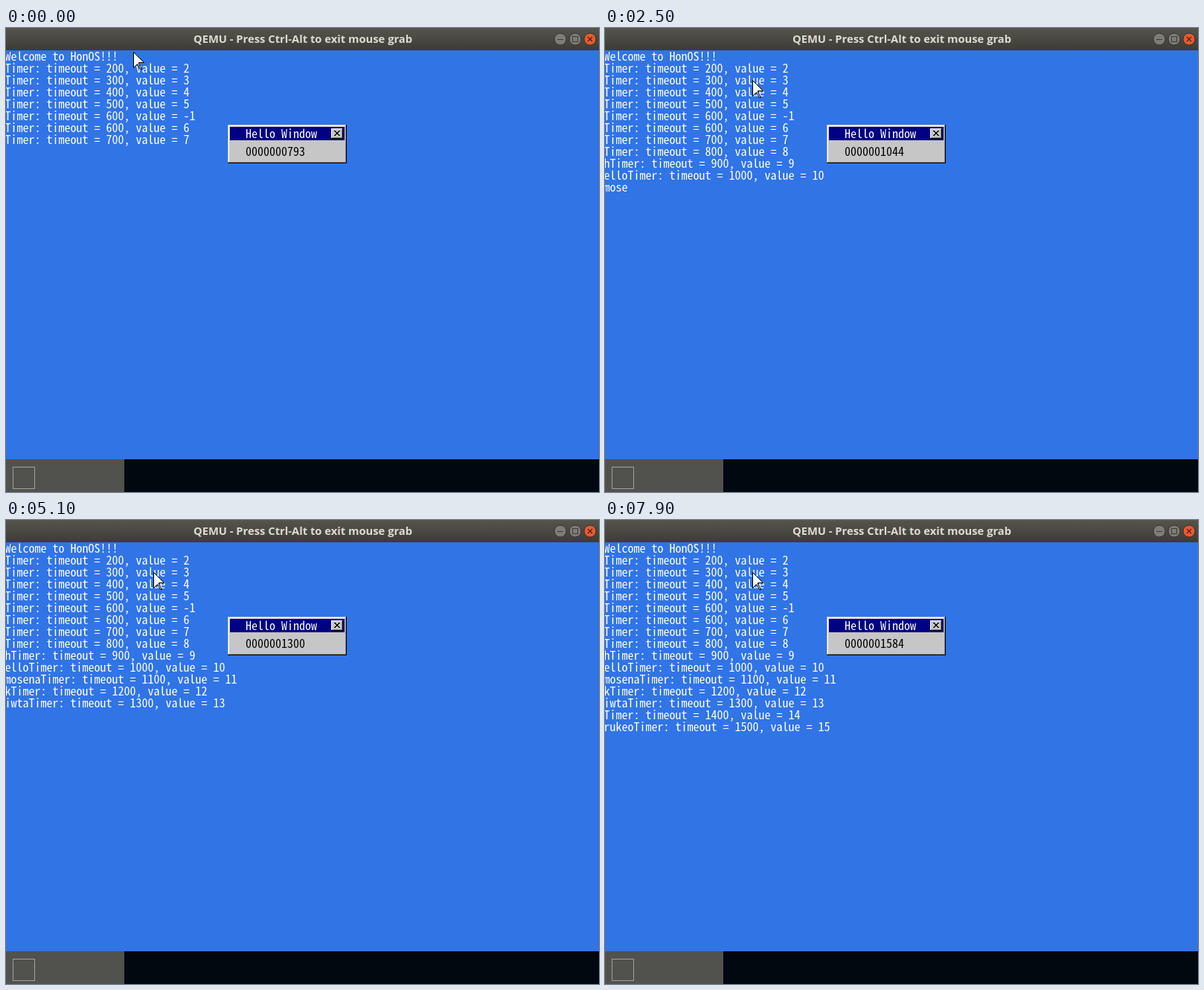
An HTML page with a canvas that plays this animation: 797 by 624 pixels, repeating every 8000 ms.

```html
<!DOCTYPE html>
<html lang="en">
<head>
<meta charset="utf-8">
<title>QEMU console</title>
<style>
  html, body { margin: 0; width: 100%; height: 100%; overflow: hidden; background: #3174e6; }
  canvas { display: block; }
</style>
</head>
<body>
<canvas id="stage" width="797" height="624"></canvas>
<script>
const ctx = document.getElementById('stage').getContext('2d');
const LOOP = 8000, STEP = 100, CELL = 8, ROW = 16;
const MONO = '300 16px "Noto Sans Mono CJK JP", "Noto Sans Mono CJK SC", "Noto Sans Mono", monospace';

const timer = (n, value = n) => `Timer: timeout = ${n}00, value = ${value}\n`;
const opening = 'Welcome to HonOS!!!\n' +
  [2, 3, 4, 5].map(n => timer(n)).join('') + timer(6, -1) + timer(6) + timer(7);

// Console output: [time in ms, text appended]
const output = [
  [0, opening], [100, timer(8)],
  [1000, 'h'], [1100, timer(9)], [1100, 'e'], [1200, 'l'], [1400, 'l'], [1500, 'o'],
  [2100, timer(10)], [2200, 'm'], [2300, 'o'], [2400, 's'], [2500, 'e'], [2600, 'n'], [2700, 'a'],
  [3100, timer(11)], [3900, 'k'],
  [4100, timer(12)], [4300, 'i'], [4500, 'w'], [4700, 't'], [4800, 'a'],
  [5100, timer(13)], [6100, timer(14)],
  [6500, 'r'], [6600, 'u'], [6700, 'k'], [6800, 'e'], [6900, 'o'],
  [7100, timer(15)],
];

// Counter readings: [time in ms, ticks]
const ticks = [[0, 793], [1100, 905], [2500, 1044], [3800, 1176], [5100, 1300], [6100, 1407], [7900, 1584]];

function countAt(t) {
  const i = Math.max(1, ticks.findIndex(k => k[0] >= t));
  const [t0, a] = ticks[i - 1], [t1, b] = ticks[i];
  return Math.round(a + (b - a) * (t - t0) / (t1 - t0));
}

function rect(x, y, w, h, color) {
  ctx.fillStyle = color;
  ctx.fillRect(x, y, w, h);
}

function print(text, x, y, color) {
  ctx.font = MONO;
  ctx.textAlign = 'left';
  ctx.fillStyle = color;
  [...text].forEach((c, i) => ctx.fillText(c, x + i * CELL, y + 14));
}

function line(points, color, width = 1) {
  ctx.beginPath();
  points.forEach(([x, y]) => ctx.lineTo(x, y));
  ctx.strokeStyle = color;
  ctx.lineWidth = width;
  ctx.stroke();
}

function button(x, fill, edge) {
  ctx.beginPath();
  ctx.arc(x, 15, 8, 0, 7);
  ctx.fillStyle = fill;
  ctx.fill();
  ctx.strokeStyle = edge;
  ctx.lineWidth = 1;
  ctx.stroke();
}

function titleBar() {
  const shade = ctx.createLinearGradient(0, 0, 0, 30);
  shade.addColorStop(0, '#56554c');
  shade.addColorStop(1, '#3c3b37');
  rect(0, 0, 797, 30, shade);
  ctx.font = 'bold 14.75px "Open Sans", "Noto Sans", sans-serif';
  ctx.textAlign = 'center';
  ctx.fillStyle = '#dfdbd2';
  ctx.fillText('QEMU - Press Ctrl-Alt to exit mouse grab', 399, 20);
  button(745, '#7d7c75', '#33322e');
  button(765, '#7d7c75', '#33322e');
  button(785, '#ea5a30', '#33322e');
  line([[741, 15.5], [749, 15.5]], '#3c3b37');
  ctx.strokeRect(761.5, 11.5, 7, 7);
  line([[782, 12], [788, 18]], '#4a2318', 1.3);
  line([[788, 12], [782, 18]], '#4a2318', 1.3);
}

function desktop() {
  rect(0, 30, 797, 550, '#3174e6');
  rect(0, 580, 797, 44, '#01080f');
  rect(0, 580, 159, 44, '#51514d');
  ctx.strokeStyle = '#a0a09e';
  ctx.lineWidth = 1;
  ctx.strokeRect(9.5, 590.5, 29, 29);
}

// Raised box: light top-left edge, grey and black bottom-right edges
function bevel(x, y, w, h, light) {
  rect(x, y, w, h, '#000');
  rect(x, y, w - 1, h - 1, light);
  rect(x + 1, y + 1, w - 2, h - 2, '#848484');
}

function counterWindow(count) {
  const x = 298, y = 130;
  bevel(x, y, 160, 52, '#c6c6c6');
  rect(x + 1, y + 1, 157, 49, '#fff');
  rect(x + 2, y + 2, 156, 48, '#c6c6c6');
  rect(x + 3, y + 3, 154, 18, '#000084');
  print('Hello Window', x + 24, y + 4, '#fff');
  bevel(x + 139, y + 5, 16, 14, '#fff');
  rect(x + 140, y + 6, 13, 11, '#c6c6c6');
  for (let i = 0; i < 7; i++) {
    rect(x + 143 + i, y + 8 + i, 2, 1, '#000');
    rect(x + 149 - i, y + 8 + i, 2, 1, '#000');
  }
  print(String(count).padStart(10, '0'), x + 24, y + 28, '#000');
}

function pointer(t) {
  const p = Math.min(1, Math.max(0, (t - 100) / 700));
  const e = p * p * (3 - 2 * p);
  ctx.save();
  ctx.translate(Math.round(171 + 27 * e) + 0.5, Math.round(32 + 38 * e) + 0.5);
  ctx.beginPath();
  [[0, 0], [14, 14], [7, 14], [7, 16], [11, 23], [9, 23], [5, 16], [0, 21]]
    .forEach(([x, y]) => ctx.lineTo(x, y));
  ctx.closePath();
  ctx.fillStyle = '#fff';
  ctx.fill();
  ctx.strokeStyle = '#000';
  ctx.lineWidth = 1;
  ctx.stroke();
  ctx.restore();
}

function draw(t) {
  desktop();
  const text = output.filter(([at]) => at <= t).map(([, s]) => s).join('');
  text.split('\n').forEach((s, i) => print(s, -1.5, 30 + i * ROW, '#fff'));
  counterWindow(countAt(t));
  pointer(t);
  titleBar();
}

const start = performance.now();
function frame() {
  const t = (performance.now() - start) % LOOP;
  draw(Math.floor(t / STEP) * STEP);
  requestAnimationFrame(frame);
}
frame();
</script>
</body>
</html>
```
